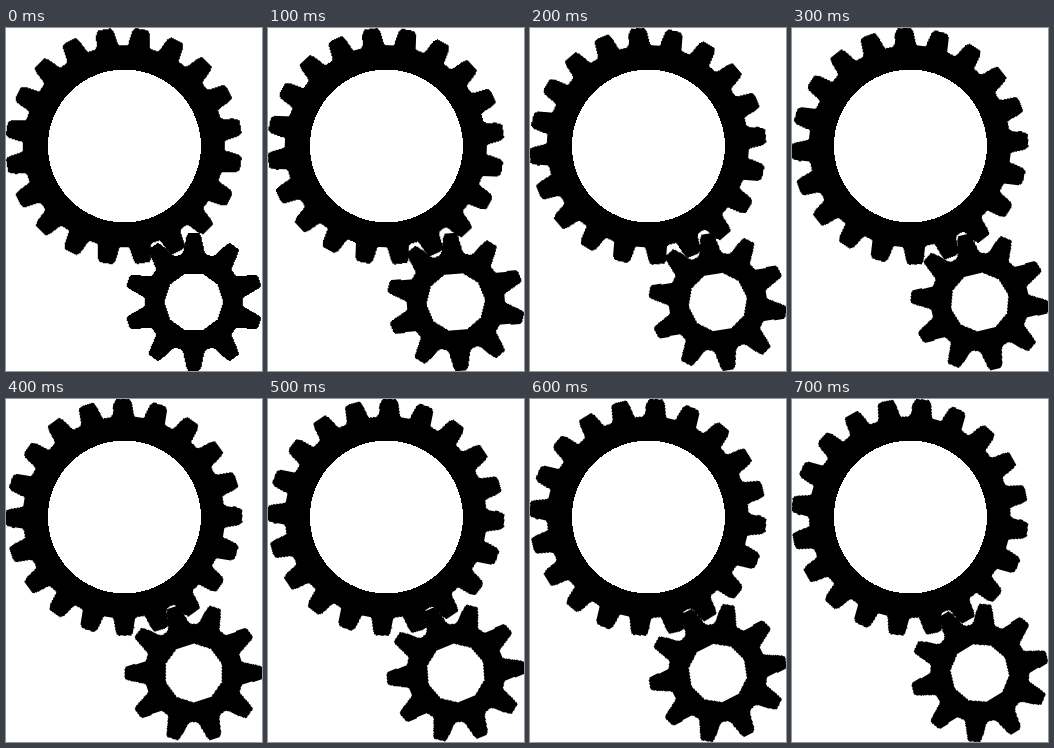
An HTML page that plays this animation: 256x343 px, repeating every 0.8 s.

```html
<!DOCTYPE html>
<html lang="en">
<head>
<meta charset="utf-8">
<title>Gears</title>
<style>
  html, body { margin: 0; width: 100%; height: 100%; overflow: hidden; background: #fff; }
  svg { display: block; width: 256px; height: 343px; }
  path { stroke: #000; stroke-width: 4; stroke-linejoin: round; shape-rendering: crispEdges; }
  .hole { fill: #fff; stroke: none; }
</style>
</head>
<body>
<svg viewBox="0 0 256 343">
  <g transform="translate(117.8 118.2)"><g id="big"></g></g>
  <g transform="translate(187.8 274)"><g id="small"></g></g>
  <circle class="hole" cx="118.4" cy="118" r="76.5" shape-rendering="crispEdges"/>
</svg>
<script>
const LOOP = 800, STEPS = 8;

// Tooth profiles: [radius, half width] from root to tip; the outline adds 2px all round.
const gears = [
  { id: 'big', teeth: 20, phase: 8.6, turn: 18,
    profile: [[98.8, 10.6], [102, 8.8], [110, 7.7], [114.5, 6.9], [116.5, 5.6]] },
  { id: 'small', teeth: 10, phase: 0, turn: -36, hole: 29.5,
    profile: [[47.5, 10.6], [51, 8.6], [59, 6.8], [65, 5.4], [67.2, 4.2]] }
];

// Angles run clockwise from the top.
const point = (r, a) => `${(r * Math.sin(a)).toFixed(2)} ${(-r * Math.cos(a)).toFixed(2)}`;
const outline = pts => `M${pts.join('L')}Z`;

function gearPath({ teeth, phase, profile }) {
  const pts = [];
  for (let i = 0; i < teeth; i++) {
    const a = (phase + i * 360 / teeth) * Math.PI / 180;
    for (const [r, w] of profile) pts.push(point(r, a - Math.asin(w / r)));
    for (const [r, w] of [...profile].reverse()) pts.push(point(r, a + Math.asin(w / r)));
  }
  return outline(pts);
}

// One corner of the hole sits between each pair of teeth.
function holePath({ hole, teeth }) {
  return outline(Array.from({ length: teeth }, (_, i) =>
    point(hole, (i + 0.5) * 2 * Math.PI / teeth)));
}

function addPath(parent, d, cls) {
  const p = document.createElementNS('http://www.w3.org/2000/svg', 'path');
  p.setAttribute('d', d);
  if (cls) p.setAttribute('class', cls);
  parent.append(p);
}

for (const gear of gears) {
  const g = document.getElementById(gear.id);
  addPath(g, gearPath(gear));
  if (gear.hole) addPath(g, holePath(gear), 'hole');
  g.animate(
    { transform: ['rotate(0deg)', `rotate(${gear.turn}deg)`] },
    { duration: LOOP, iterations: Infinity, easing: `steps(${STEPS}, end)` }
  ).startTime = 0;
}
</script>
</body>
</html>
```
